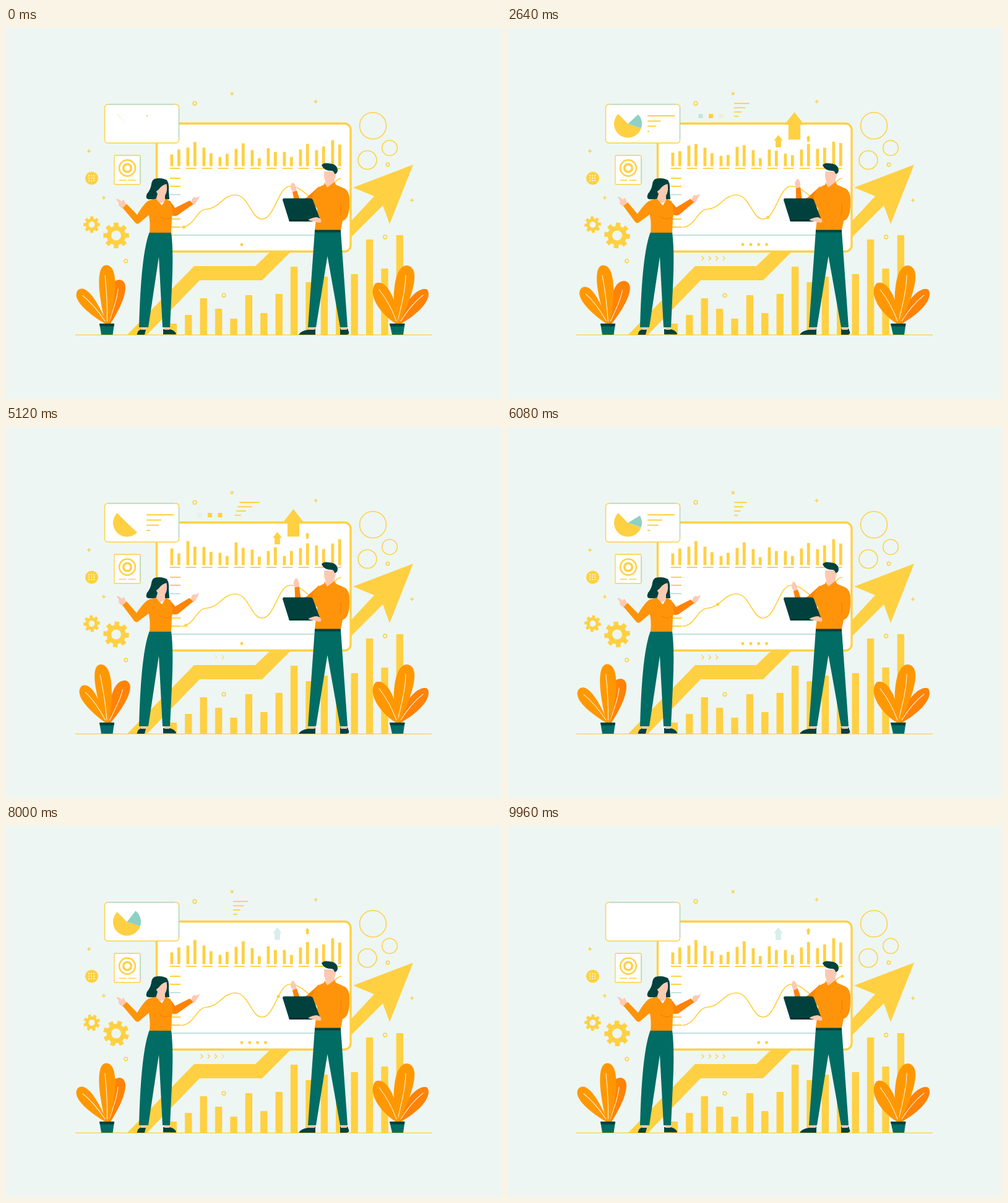
An HTML page for the animation above (10 s loop, 800x600 px).

```html
<!DOCTYPE html>
<html lang="en">
<head>
<meta charset="utf-8">
<title>Growth presentation</title>
<style>
html, body { margin: 0; width: 100%; height: 100%; overflow: hidden; background: #edf6f3; }
svg { display: block; width: 100vw; height: 100vh; }
.y { fill: #ffd042; }
.o { fill: #ff9800; }
.j { fill: #ff940a; }
.d { fill: #ff8306; }
.t { fill: #006c63; }
.k { fill: #00413e; }
.s { fill: #fdc9b2; }
.w { fill: #fff; }
.ly { fill: none; stroke: #ffd042; }
.lt { fill: none; stroke: #a9d9d3; }
.vein { fill: none; stroke: #fff0d8; stroke-width: 1.1; stroke-linecap: round; }
.fold { fill: none; stroke: #f07d00; stroke-width: 1; }
</style>
</head>
<body>
<svg viewBox="0 0 800 600" xmlns="http://www.w3.org/2000/svg">
  <rect width="800" height="600" fill="#edf6f3"/>
  <g id="columns" class="y"></g>
  <path class="y" d="M196 496L304 385H403L429 360L500 330L556 314L595 272L561 258L658 221L620 317L609 287L557 339L520 350L461 361L414 408H313L228 496Z"/>
  <path class="ly" stroke-width="1.3" d="M112 496.3H688"/>

  <g id="board">
    <rect class="w" x="243.5" y="154.5" width="313.5" height="207" rx="10"/>
    <rect class="ly" x="243.5" y="154.5" width="313.5" height="207" rx="10" stroke-width="3.3"/>
    <path class="lt" stroke-width="1.3" d="M265 335H500"/>
    <path class="ly" stroke-width="2" d="M265 243H282M265 256H282M265 296H282M265 309H282M265 322H282"/>
    <path class="lt" stroke-width="1.5" d="M265 269.5H282"/>
    <path id="curve" class="ly" stroke-width="1.7" d="M283 322H287C305 318 308 294 324 293C345 292 350 270 371 270C392 270 396 309 414 309C434 309 440 256 459 256C480 256 485 275 500 275C520 275 528 244 542 243"/>
    <g id="minis" class="y"></g>
    <g id="dots" class="y"></g>
    <circle id="runner" class="y" r="2.5"/>
  </g>
  <g id="ups" class="y"></g>
  <g id="squares"></g>
  <g id="slants" class="ly" stroke-width="1.8"></g>
  <g id="chevrons" class="ly" stroke-width="1.4"></g>

  <g id="card">
    <rect class="w" x="159.5" y="123.5" width="120" height="62.5" rx="5"/>
    <rect class="ly" x="159.5" y="123.5" width="120" height="62.5" rx="5" stroke-width="1.4"/>
    <path class="lt" stroke-width="1.3" d="M166 123.5H272M279.5 130V180"/>
    <path id="pieA" class="y"/>
    <path id="pieB" fill="#8fd0c4"/>
    <path id="pieC" class="ly" stroke-width="0.9"/>
    <g id="rows" class="y"></g>
  </g>
  <g id="tile">
    <rect class="w" x="175" y="206" width="42" height="47" rx="2"/>
    <rect class="ly" x="175" y="206" width="42" height="47" rx="2" stroke-width="1.3"/>
    <path class="lt" stroke-width="1.3" d="M217 209V250"/>
    <circle class="ly" cx="196" cy="226.5" r="12.9" stroke-width="2.5"/>
    <circle class="ly" cx="196" cy="226.5" r="6.3" stroke-width="3.5"/>
    <path class="ly" stroke-width="1.6" d="M182.5 246.3H194.5M197.5 246.3H209.5"/>
  </g>
  <circle class="y" cx="138.5" cy="243" r="10.5"/>
  <g id="holes" fill="#fffbe8"></g>
  <g class="ly" stroke-width="1.5">
    <circle cx="593" cy="158" r="21.5"/><circle cx="620" cy="194" r="12.3"/><circle cx="584" cy="213.5" r="15"/>
    <circle cx="305" cy="122" r="2.9"/><circle cx="193.7" cy="376.8" r="2.9"/><circle cx="352" cy="432.3" r="2.9"/>
    <circle cx="617" cy="221" r="2.7"/><circle cx="612.7" cy="338" r="2.9"/>
    <path d="M131 199H137M134 196V202M155 274.5H161M158 271.5V277.5M497.5 119H503.5M500.5 116V122M653 278.5H659M656 275.5V281.5M363 104L367.6 108.4M367.6 104L363 108.4"/>
  </g>
  <path id="gearA" class="y" fill-rule="evenodd"/>
  <path id="gearB" class="y" fill-rule="evenodd"/>

  <g id="plantL">
    <g id="leafR"><path class="d" d="M165 478C161 448 163 407 184 407C202 410 191 444 169 478Z"/><path class="vein" d="M167 474C175 450 180 436 181 422"/></g>
    <g id="leafM"><path class="o" d="M161 478C152 446 142 384 162 383.5C185 384 176 446 166 478Z"/><path class="vein" d="M163.5 474C164 445 162 420 160 400"/></g>
    <g id="leafL"><path class="o" d="M160 478C139 466 104 440 116 424C131 411 152 450 163 478Z"/><path class="vein" d="M160 474C148 456 138 444 124 433"/></g>
    <path class="t" d="M151 478H175L172.5 496H154Z"/><path class="k" d="M151 478H175L174.4 482.5H152Z"/>
  </g>
  <g id="plantR">
    <path class="d" d="M634 478C640 445 667 416 681 423C691 440 661 466 638 478Z"/><path class="vein" d="M638 474C649 456 660 443 674 432"/>
    <path class="o" d="M630 478C624 446 624 385 648 384C675 388 651 446 635 478Z"/><path class="vein" d="M633 474C640 445 646 420 646 400"/>
    <path class="o" d="M630 478C605 463 583 431 597 413C617 404 634 448 634 478Z"/><path class="vein" d="M631 474C624 455 614 437 603 423"/>
    <path class="t" d="M620 478H644.5L642 496H624Z"/><path class="k" d="M620 478H644.5L643.8 482.5H621Z"/>
  </g>

  <g id="woman">
    <path class="k" d="M211.5 496Q213 488 221 486L226 488L224 496ZM254 487H264Q274 489 275 495.5H254Z"/>
    <path class="s" d="M218 481H228L226 488H218ZM255 481H264V488H256Z"/>
    <path class="t" d="M232 330H267Q271 360 268 420L265 484H253L247 370L230 484H215Q218 365 232 330Z"/>
    <path class="k" d="M240 244Q250 241 260 246Q264 252 263 262L264 277H232Q224 277 228 268Q234 261 235 252Q236 246 240 244Z"/>
    <g id="armL">
      <path class="s" d="M188 292L182 287Q184 283 178 277Q181 275 187 281Q189 276 191 279L195 287Z"/>
      <path class="j" d="M231 279Q224 282 212 302L195 284.5L188.5 291L209 315Q213 319 217 314L235 299Z"/>
    </g>
    <g id="armR">
      <path class="s" d="M299 281Q301 274 305 273Q306 276 313 271.5Q312 276 305 285L300 287Z"/>
      <path class="d" d="M262 279Q268 282 273 291L297 279L302.5 285L277 303Q270 306 264 300Z"/>
    </g>
    <path class="s" d="M245 268H257V278Q252 288 242 278Z"/>
    <path class="j" d="M231 279L242 276L252 287L258 276.5L266 280Q271 295 268 308L267 331H232Q234 310 229 296Z"/>
    <path class="fold" d="M248 305Q258 312 267 306"/>
    <path class="s" d="M243 256Q254 253 259 250Q262 263 257 271Q252 275 247 270Q241 266 243 256Z"/>
    <path class="k" d="M238 250Q246 242 259 246L260 252Q251 254 246 262L240 266Z"/>
  </g>

  <g id="man">
    <path class="k" d="M473 496Q476 490 488 488L500 486V496ZM540 486H552L554.5 493Q554 496 550 496H540Z"/>
    <path class="s" d="M489 481H500L499 488H489ZM541 481H551V488H541Z"/>
    <path class="t" d="M499 328H541L552 484H540L519.5 369L501 484H488Z"/>
    <path class="d" d="M468 276Q478 280 486 274L506 256L506 284L472 286Z"/>
    <g id="foreArm">
      <path class="s" d="M464 266Q458 259 461 253Q462 249 465 251Q470 256 469.5 264Z"/>
      <path class="d" d="M463 265.5L470 263L476 281L467 284Z"/>
    </g>
    <path class="j" d="M513 254Q502 258 497 268L494 282L503 292L499 327H541L544 312Q556 308 555 280Q556 266 548 260L532 253Z"/>
    <path class="s" d="M515 243H531V254Q524 266 517 255Z"/>
    <path class="j" d="M515 250L519 258L531 249L534 255L522 263L513 256Z"/>
    <path class="fold" d="M541 283Q543 294 539 306"/>
    <path class="s" d="M514 232H533Q534 247 524 249Q514 250 514 240Z"/>
    <path class="k" d="M510 222Q513 217 522 219Q534 219 536 229Q536 236 531 236Q530 231 526 231Q514 231 510 222Z"/>
    <path class="k" d="M499 326.5H541V330.5H499Z"/>
    <path class="k" d="M449 275.5H492Q495 275.5 496 278L508 310.5Q507 313 504 313H459Q457 313 457 310L447 278Q447 275.5 449 275.5Z"/>
    <path d="M459 311H490" stroke="#002725" stroke-width="1.6"/>
    <path class="s" d="M489 310Q496 306 503 306L511 310L508 315Q499 314 489 311Z"/>
    <path class="j" d="M508 308L540 302V312L511 315.5Z"/>
  </g>
</svg>
<script>
const LOOP = 10000, NS = 'http://www.w3.org/2000/svg';
const $ = id => document.getElementById(id);
const clamp = v => Math.max(0, Math.min(1, v));
const mix = (a, b, k) => a + (b - a) * k;
const ramp = (v, a, b) => clamp((v - a) / (b - a));
// smooth hump: 1 at mid, 0 beyond half either side
const bump = (v, mid, half) => Math.abs(v - mid) < half ? Math.cos((v - mid) / half * Math.PI / 2) ** 2 : 0;
const set = (e, o) => { for (const k in o) e.setAttribute(k, o[k]); return e; };
const add = (parent, tag, o = {}) => $(parent).appendChild(set(document.createElementNS(NS, tag), o));
const turn = (id, deg, x, y) => set($(id), { transform: `rotate(${deg} ${x} ${y})` });
const row = (n, make) => Array.from({ length: n }, (_, i) => make(i));

[18, 32, 59, 42, 26, 64, 35, 66, 110, 85, 94, 116, 98, 154, 107, 161].forEach((height, i) =>
  add('columns', 'rect', { x: 264.7 + i * 24.4, y: 496 - height, width: 11.4, height, rx: 1 }));
row(9, i => add('holes', 'rect', { x: 133.3 + i % 3 * 4, y: 237.8 + Math.floor(i / 3) * 4, width: 1.9, height: 1.9 }));

// pairs of small bars that trade heights
const tall = [19, 27, 30, 39, 30, 21, 15, 20, 28, 37, 26, 13, 29, 23, 23, 15, 27, 36, 26, 32, 42, 35];
const bars = tall.map((_, i) => add('minis', 'rect', { x: 265.5 + (i >> 1) * 26 + (i % 2) * 11.4, width: 4.8 }));
row(11, i => add('minis', 'rect', { x: 264.5 + i * 26, y: 226, width: 17, height: 1.9 }));

const dots = row(4, i => add('dots', 'rect', { x: 378.8 + i * 12.8, y: 348, width: 4.4, height: 4.4, rx: 1 }));
const squares = row(3, i => add('squares', 'rect', { x: 309.5 + i * 16.5, y: 139, width: 7, height: 7, fill: i ? '#ffd042' : '#c4e5de' }));
const slants = row(4, () => add('slants', 'path'));
const chevrons = row(4, i => add('chevrons', 'path', { d: `M${314.5 + i * 11.4} 369l3.5 3.5l-3.5 3.5` }));
const rows = row(4, i => add('rows', 'rect', { x: 227, y: 141 + i * 8.4, height: 2, rx: 0.6 }));

const arrow = (x, y, w, h) => add('ups', 'path', {
  d: `M${x} ${y}l${w / 2} ${h * 0.46}h${-w * 0.2}V${y + h}h${-w * 0.6}V${y + h * 0.46}h${-w * 0.2}Z`
});
const ups = [arrow(487, 167, 7, 10.5), arrow(438.5, 166.5, 14.5, 20), arrow(464.5, 129.5, 32, 44.5)];

function gear(id, x, y, r, hole) {
  const at = (a, q) => `${x + q * Math.sin(a)} ${y - q * Math.cos(a)}`;
  const tooth = i => [[-0.25, 0.74], [-0.18, 1], [0.18, 1], [0.25, 0.74]]
    .map(([o, q]) => at(i * Math.PI / 4 + o, r * q)).join('L');
  const ring = `a${hole} ${hole} 0 1 0 ${2 * hole} 0a${hole} ${hole} 0 1 0 ${-2 * hole} 0Z`;
  set($(id), { d: `M${row(8, tooth).join('L')}ZM${x - hole} ${y}${ring}` });
}
gear('gearA', 138.5, 318, 13.5, 5);
gear('gearB', 178, 335.5, 21, 8);

// pie angles run counterclockwise from the upper left, in degrees
function rim(deg, r = 22.5) {
  const a = (135 + deg) * Math.PI / 180;
  return `${195.5 + r * Math.cos(a)} ${155 - r * Math.sin(a)}`;
}
function sector(id, from, to) {
  const arc = `M195.5 155L${rim(from)}A22.5 22.5 0 ${+(to - from > 180)} 0 ${rim(to)}Z`;
  set($(id), { d: to - from < 0.5 ? '' : arc });
}

const curve = $('curve'), len = curve.getTotalLength();
function onCurve(x) {
  let a = 0, b = len;
  for (let i = 0; i < 16; i++) {
    const m = (a + b) / 2;
    if (curve.getPointAtLength(m).x < x) a = m; else b = m;
  }
  return curve.getPointAtLength(a);
}

function drawPeople(p) {
  const sway = (1 - Math.cos(p * 2 * Math.PI)) / 2, lift = 1.2 * bump(p, 0.435, 0.285);
  turn('leafM', -6 * sway, 163, 478);
  turn('leafL', 6 * sway, 163, 478);
  turn('leafR', 8 * sway, 166, 478);
  turn('armL', 5 * lift, 231, 285);
  turn('armR', -6 * lift, 264, 285);
  set($('foreArm'), { transform: `translate(${2 * lift} ${-7 * lift}) rotate(${14 * lift} 470 277)` });
}

function drawBoard(t, p) {
  bars.forEach((b, i) => {
    const late = (i >> 1) % 3 === 2;
    const height = mix(tall[i], tall[i ^ 1], bump(p, late ? 0.76 : 0.56, late ? 0.24 : 0.4));
    set(b, { y: 223.5 - height, height });
  });
  const pt = onCurve(mix(287.5, 542, ramp(t % 5000, 60, 4960)));
  set($('runner'), { cx: pt.x, cy: pt.y });

  const c = t % 1680 / 1680;
  dots.forEach((e, i) => set(e, { opacity: +(c >= i * 0.07 && c < 0.86 + i * 0.042) }));
}

function drawSigns(t, p) {
  // arrows keep rising while they fade; the last trace crosses the cycle end
  const ph = p < 0.03 && t > 1000 ? p + 1 : p;
  ups.forEach((e, i) => {
    const pale = i === 1 && ph > 0.93;
    const seen = ramp(ph, 0.06 + i * 0.06, 0.2 + i * 0.06), gone = i ? ramp(ph, 0.86, 0.95) : 0;
    set(e, {
      transform: `translate(0 ${(0.81 - ph) * 13.5})`,
      fill: pale ? '#d6eeec' : '#ffd042',
      opacity: pale ? 1 : seen * (1 - gone)
    });
  });
  squares.forEach((e, i) => set(e, {
    opacity: ramp(p, 0.15 + i * 0.08, 0.22 + i * 0.08) * (1 - ramp(p, 0.51 + i * 0.08, 0.58 + i * 0.06))
  }));

  // lines grow to the right, then trim from the left
  const q = t % 1800 / 1000;
  const end = q < 0.04 || t >= 9000 ? 0 : clamp(0.055 + 0.56 * q), from = ramp(q, 1.46, 1.74);
  [47, 34, 23, 14].forEach((w, i) =>
    set(slants[i], { d: end > from ? `M${367 + w * from} ${122 + i * 6.9}H${367 + w * end}` : '' }));
  chevrons.forEach((e, i) => set(e, {
    opacity: ramp(q, 0.15 + i * 0.19, 0.3 + i * 0.19) * (1 - ramp(q, 1.2 + i * 0.08, 1.4 + i * 0.1))
  }));
}

function drawCard(t) {
  // two fills of 3.6 s, then the pie closes again
  const c = t % 3600 / 1000, closing = t >= 7200;
  const sweep = 322 * (closing ? 1 - ramp(t, 7200, 9340) ** 2 : ramp(c, 0, 3.44) ** 0.7);
  sector('pieA', 0, Math.min(sweep, 207));
  sector('pieB', 207, Math.min(sweep, 277));
  let d = '';
  for (let a = 280; a < sweep; a += 6) d += `M${rim(a, 7)}L${rim(a, 22)}`;
  set($('pieC'), { d });

  [44, 24, 20, 7].forEach((w, i) => {
    const grow = ramp(c, i * 0.25 - 0.05, i * 0.25 + 0.9), shrink = ramp(c, 2.7 - i * 0.15, 3.55 - i * 0.2);
    set(rows[i], { width: closing ? 0 : w * grow * (1 - shrink) });
  });
}

function draw(t) {
  const p = t % 2000 / 2000;
  turn('gearA', -t * 0.036, 138.5, 318);
  turn('gearB', t * 0.036, 178, 335.5);
  drawPeople(p);
  drawBoard(t, p);
  drawSigns(t, p);
  drawCard(t);
}

const start = performance.now();
function tick() {
  draw((performance.now() - start) % LOOP);
  requestAnimationFrame(tick);
}
draw(0);
requestAnimationFrame(tick);
</script>
</body>
</html>
```
